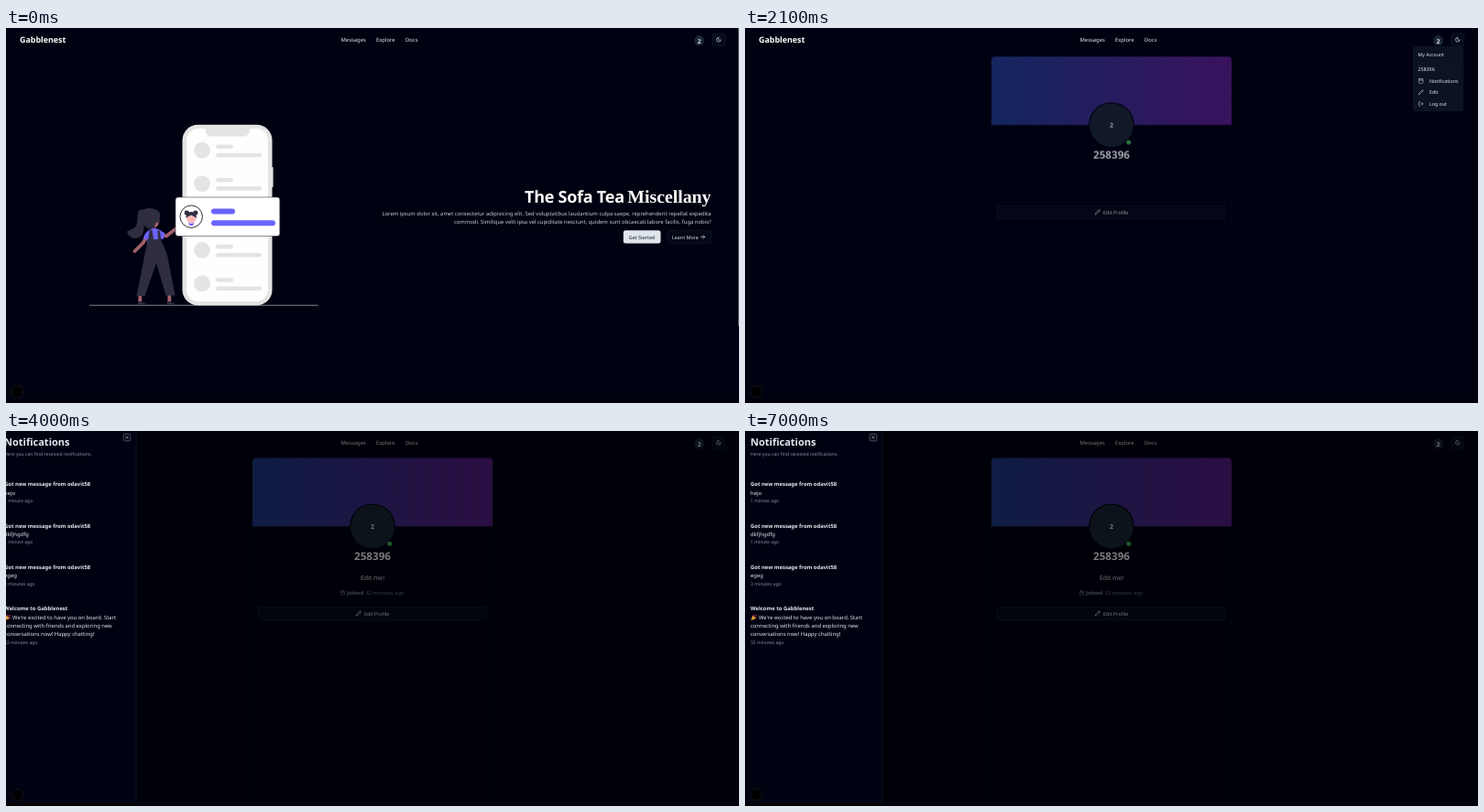
An HTML page that plays this animation: 800 px wide and 410 px high, repeating every 7.4 s.

```html
<!DOCTYPE html>
<html lang="en">
<head>
<meta charset="utf-8">
<title>Chat app tour</title>
<style>
html, body { margin: 0; width: 100%; height: 100%; overflow: hidden; background: #000211; }
svg { display: block; }
text { font-family: "Noto Sans", "Open Sans", sans-serif; fill: #e6e9ee; text-rendering: geometricPrecision; white-space: pre; }
.b6 { font-weight: 600; }
.b7 { font-weight: 700; }
.b8 { font-weight: 800; }
.mid { text-anchor: middle; }
.end { text-anchor: end; }
.t50 { font-size: 5px; }
.t53 { font-size: 5.3px; }
.t59 { font-size: 5.88px; }
.muted { fill: #8591a5; }
.soft { fill: #c9ced7; }
.icon { fill: none; stroke: #e3e7ed; stroke-width: 2.4; stroke-linecap: round; stroke-linejoin: round; }

/* One loop is 7400 ms; 100 ms is 1.3513 %. */
.anim { animation: 7400ms linear infinite paused; }
#scrollbar { animation-name: scrollbar; animation-timing-function: step-end; }
#landing { animation-name: landing; animation-timing-function: step-end; }
#status { animation-name: status; animation-timing-function: step-end; }
#profile { animation-name: profile; }
#details { animation-name: details; }
#menu { animation-name: menu; transform-origin: 784px 20px; }
#hover { animation-name: hover; animation-timing-function: step-end; }
#dim { animation-name: dim; }
#sheet { animation-name: sheet; }
#unread { animation-name: unread; }
#close { animation-name: close; }

@keyframes scrollbar {
  0% { opacity: 1 } 1.351% { opacity: .75 } 2.702% { opacity: .6 } 13.513%, 100% { opacity: 0 }
}
@keyframes landing { 0% { opacity: 1 } 27.027%, 100% { opacity: 0 } }
@keyframes status { 0% { opacity: 0 } 24.324% { opacity: 1 } 27.027%, 100% { opacity: 0 } }
@keyframes profile {
  0%, 27.02% { opacity: 0; transform: translateY(4px) }
  27.027% { opacity: .3; transform: translateY(4px) }
  28.378% { opacity: .66; transform: translateY(1.7px) }
  29.729% { opacity: .85; transform: translateY(.8px) }
  31.081% { opacity: .95; transform: translateY(.3px) }
  33.783%, 100% { opacity: 1; transform: none }
}
@keyframes details {
  0%, 28.4% { opacity: 0; animation-timing-function: ease-out }
  33.783% { opacity: .96 }
  36.486%, 100% { opacity: 1 }
}
@keyframes menu {
  0%, 13.1% { opacity: 0; transform: translateY(-2px) scale(.95); animation-timing-function: ease }
  15.4%, 48.65% { opacity: 1; transform: none }
  50.2%, 100% { opacity: 0; transform: scale(.95) }
}
@keyframes hover {
  0% { opacity: 0; transform: none }
  20.27% { opacity: .25; transform: none }
  40.54% { opacity: 1; transform: translateY(37.5px) }
  43.243%, 100% { opacity: 1; transform: translateY(12.5px) }
}
@keyframes dim {
  0%, 49.189% { opacity: 0; animation-timing-function: ease }
  51.216%, 100% { opacity: .5 }
}
@keyframes sheet {
  0%, 49.189% { transform: translateX(-151px); animation-timing-function: cubic-bezier(.4, 0, .2, 1) }
  55.945%, 100% { transform: none }
}
@keyframes unread {
  0%, 58.918% { opacity: 0 }
  61.62%, 65.6% { opacity: 1 }
  68.918%, 100% { opacity: 0 }
}
@keyframes close {
  0%, 77.5% { opacity: .8 }
  79.729%, 92.5% { opacity: 1 }
  94.594%, 100% { opacity: .8 }
}
</style>
</head>
<body>
<svg width="800" height="410" viewBox="0 0 800 410">
  <defs>
    <linearGradient id="bannerFill">
      <stop offset="0" stop-color="#1e3a8a"/><stop offset="1" stop-color="#581c87"/>
    </linearGradient>
    <g id="row" fill="#e4e4e3">
      <circle cx="214" cy="133.7" r="8.9"/>
      <rect x="229" y="127.5" width="19" height="4.6" rx="2.3"/>
      <rect x="229" y="136.7" width="50" height="4.6" rx="2.3"/>
    </g>
    <g id="pencil"><path d="M17 3a2.8 2.8 0 1 1 4 4L7.500 20.500 2 22l1.500-5.500ZM15 5l4 4"/></g>
    <g id="calendar"><path d="M8 2v4M16 2v4M3 10h18"/><rect x="3" y="4" width="18" height="18" rx="2"/></g>
  </defs>

  <rect width="800" height="410" fill="#000211"/>

  <g id="landing" class="anim">
    <path d="M91 303.200H340.500" stroke="#85868c"/>
    <!-- phone -->
    <rect x="289" y="152" width="2.600" height="22" rx="1" fill="#e4e4e3"/>
    <rect x="192.500" y="105.700" width="98" height="197.500" rx="17" fill="#e4e4e3"/>
    <rect x="197" y="110" width="89" height="189" rx="13" fill="#fefefc"/>
    <path d="M217.500 109.500H266V112a6.500 6.500 0 0 1-6.500 6.500H224a6.500 6.500 0 0 1-6.500-6.500Z" fill="#e4e4e3"/>
    <use href="#row"/><use href="#row" y="36.400"/><use href="#row" y="109.300"/><use href="#row" y="145.700"/>

    <!-- woman -->
    <g fill="#2f2e41">
      <path d="M152 199C142 195 144 206 143 213C141.500 221 137 219 132 222.500C134 231 146 233 149.500 224C152 217 149 211 154 207Z"/>
      <path d="M144 301.500C143 299 146 299 148 299.500L154.500 302.500H143.500ZM175.500 301.500C175 299 178 299 180 299.500L186 302.500H175.500Z"/>
    </g>
    <g fill="none" stroke="#a0616a" stroke-linecap="round" stroke-width="3.800">
      <path d="M155 226L149.500 235L140.500 244M168 226L175 227.500L186 219"/>
      <path d="M146.300 290V299M178.300 290V299M161 214V222" stroke-linecap="butt"/>
    </g>
    <ellipse cx="162" cy="210" rx="5.500" ry="8" fill="#a0616a"/>
    <path d="M146.500 206C146 196 160 194.500 167 201C169.500 205 168 210 166.500 214C164 210 163 214 162 219C155 222 147 215 146.500 206Z" fill="#2f2e41"/>
    <path d="M157 220.500C161 218.500 165 219 168 221L173.500 224.500L171.500 231L166 230L165 238H154L154.500 231L149.500 230.500C151 226 153 222.500 157 220.500Z" fill="#6c63ff"/>
    <path d="M156.500 221.500L159.500 220.500L161 231H166L165.500 221L168 222L169.500 233C172 239 175 243 176.500 251L184.500 292.500H174.500L164 257L151.500 293H142.500L149.500 258C151 249 152 243 154.500 235Z" fill="#2f2e41"/>

    <!-- highlighted message -->
    <rect x="185" y="185" width="113.800" height="42.500" rx="3" fill="#fff" stroke="#3f3d56" stroke-width=".6"/>
    <circle cx="202.200" cy="206.200" r="12.200" fill="#fff" stroke="#2f2e41"/>
    <circle cx="202.200" cy="208" r="5.200" fill="#ffb8b8"/>
    <g fill="#2f2e41">
      <circle cx="197.300" cy="202" r="2.600"/><circle cx="206.800" cy="202" r="2.600"/>
      <path d="M196.500 208C196 202 200 201 202 201C206 201 208.500 204 207.800 208C206 206 204 205.500 202 204.500C200 205.500 198 206 196.500 208Z"/>
    </g>
    <path d="M199 212.500Q202 215 205.500 212.500L204 216H200.500Z" fill="#6c63ff"/>
    <g fill="#6c63ff">
      <rect x="224" y="197.500" width="26" height="6" rx="3"/>
      <rect x="224" y="210.300" width="70" height="6" rx="3"/>
    </g>

    <text class="b8 end" x="674.800" y="190.800" font-size="18" letter-spacing="-.25" style="fill:#fff">The Sofa Tea</text>
    <text class="b7 end" x="769.500" y="190.800" font-size="19.800" style="fill:#fff;font-family:'Liberation Serif',serif">Miscellany</text>
    <text class="t59 end soft" x="769.500" y="205">Lorem ipsum dolor sit, amet consectetur adipisicing elit. Sed voluptatibus laudantium culpa saepe, reprehenderit repellat expedita</text>
    <text class="t59 end soft" x="769.500" y="214.300">commodi. Similique velit ipsa vel cupiditate nesciunt, quidem sunt obcaecati labore facilis, fuga nobis?</text>
    <rect x="673.800" y="221.200" width="40.700" height="14.300" rx="2.500" fill="#dfe5ea"/>
    <text class="t53 mid" x="694" y="230.500" style="fill:#0f172a">Get Started</text>
    <rect x="722.300" y="221.500" width="47" height="13.800" rx="2.500" fill="#030817" stroke="#151d2d" stroke-width=".6"/>
    <text class="t53" x="727" y="230.500">Learn More</text>
    <path class="icon" transform="translate(757.300 225.200) scale(.27)" d="M4 12h16M13 5l7 7-7 7"/>
  </g>

  <g id="profile" class="anim">
    <path d="M268.500 407V33.500a4 4 0 0 1 4-4H527.500a4 4 0 0 1 4 4V407" fill="none" stroke="#060b1a" stroke-width=".8"/>
    <path d="M269 104.300V33.500a4 4 0 0 1 4-4H527a4 4 0 0 1 4 4V104.300Z" fill="url(#bannerFill)"/>
    <circle cx="400" cy="104.400" r="25" fill="#000211"/>
    <circle cx="400" cy="104.400" r="23.800" fill="#1a2736"/>
    <text class="b6 mid" x="400" y="107" font-size="7">2</text>
    <circle cx="418.700" cy="123.300" r="2.500" fill="#3fae55"/>
    <text class="b6 mid" x="400" y="141" font-size="11.650" style="fill:#f4f6f9">258396</text>
    <g id="details" class="anim">
      <text class="mid" x="400" y="162.600" font-size="6.800">Edit me!</text>
      <use class="icon" href="#calendar" transform="translate(364.900 174.200) scale(.225)" style="stroke:#7b8595"/>
      <text class="b6" x="372" y="179.200" font-size="5.800" style="fill:#828c9c">Joined</text>
      <text x="392.500" y="179.200" font-size="5.770" style="fill:#6a7485">32 minutes ago</text>
    </g>
    <rect x="275.300" y="192.500" width="249.400" height="14" rx="2.500" fill="#050b1b" stroke="#151e30" stroke-width=".7"/>
    <use class="icon" href="#pencil" transform="translate(381.700 196.300) scale(.265)"/>
    <text x="391" y="201.500" font-size="5.400">Edit Profile</text>
  </g>

  <g id="header">
    <text class="b8" x="15" y="16.200" font-size="8.900" style="fill:#fff">Gabblenest</text>
    <text class="t59" x="365.500" y="15">Messages</text>
    <text class="t59" x="404" y="15">Explore</text>
    <text class="t59" x="436" y="15">Docs</text>
    <rect x="751.500" y="8.300" width="10.200" height="11" rx="4.600" fill="#1a2736"/>
    <text class="b6 mid" x="756.600" y="16.500" font-size="6.600">2</text>
    <rect x="770.800" y="6" width="14" height="14" rx="2.500" fill="#060c1c" stroke="#131b2b" stroke-width=".7"/>
    <path class="icon" transform="translate(774.700 9.700) scale(.255)" d="M12 3a6 6 0 0 0 9 9 9 9 0 1 1-9-9Z"/>
  </g>

  <g id="menu" class="anim">
    <rect x="729.500" y="20.600" width="54.300" height="70" rx="2.500" fill="#0a1223" stroke="#111a2b" stroke-width=".7"/>
    <path d="M730 37.300H783.500" stroke="#131c2e" stroke-width=".5"/>
    <rect id="hover" class="anim" x="731.500" y="39.300" width="50.300" height="12.300" rx="1.500" fill="#0f182a"/>
    <text x="734.500" y="31.300" font-size="5.200">My Account</text>
    <text class="t53" x="734.500" y="47.400">258396</text>
    <text class="t53" x="747" y="59.800">Notifications</text>
    <text class="t53" x="747" y="72.300">Edit</text>
    <text class="t53" x="747" y="84.900">Log out</text>
    <g class="icon" style="stroke:#a7afbc">
      <use href="#calendar" transform="translate(734.600 54.600) scale(.26)"/>
      <use href="#pencil" transform="translate(734.600 67.200) scale(.26)"/>
      <path transform="translate(734.600 79.800) scale(.26)" d="M9 21H5a2 2 0 0 1-2-2V5a2 2 0 0 1 2-2h4M16 17l5-5-5-5M21 12H9"/>
    </g>
  </g>

  <rect y="406.500" width="800" height="3.500" fill="#050008"/>
  <rect id="scrollbar" class="anim" x="799" width="1" height="326" fill="#5a5f68"/>
  <rect id="dim" class="anim" width="800" height="410"/>

  <g id="sheet" class="anim">
    <rect x="-1" width="151" height="406.500" fill="#000212"/>
    <path d="M150 0V406.500" stroke="#10182a" stroke-width=".8"/>
    <text class="b6" x="6" y="16" font-size="11">Notifications</text>
    <text class="muted" x="6" y="26.600" font-size="5.100">Here you can find received notifications.</text>
    <g id="close" class="anim">
      <rect x="136.200" y="3.200" width="7.600" height="7.600" rx="1.600" fill="none" stroke="#7d8694" stroke-width=".8"/>
      <path d="M138.300 5.300L141.700 8.700M141.700 5.300L138.300 8.700" stroke="#c3c9d2" stroke-width=".7"/>
    </g>
    <rect id="unread" class="anim" y="183.200" width="146.300" height="57.600" fill="#1a2735"/>
    <g id="notes"></g>
    <path d="M6.500 207L8.500 201.500L12 205Z" fill="#e8a33a"/>
    <path d="M9.500 200.500L10.500 202.500M12.500 201L11 203.500M13 204.500L11.500 204" stroke="#d9485f" stroke-width=".8"/>
  </g>

  <circle cx="12.500" cy="397.700" r="6.400" fill="#000" stroke="#1b1c20" stroke-width=".7"/>

  <g id="status" class="anim">
    <path d="M0 403.800H133.500a2 2 0 0 1 2 2V410H0Z" fill="#25272b"/>
    <text x="1" y="408.800" font-size="4.360" style="fill:#c2c5ca">localhost:3000/profile/5c167a47-29fe-4b46-89eb-12b6345f10a9</text>
  </g>
</svg>
<script>
const sender = "Got new message from odavit58";
const notes = [
  [sender, ["hejo"], "1 minute ago"],
  [sender, ["dkfjhgdfg"], "1 minute ago"],
  [sender, ["egeg"], "3 minutes ago"],
  ["Welcome to Gabblenest", [
    "We're excited to have you on board. Start",
    "connecting with friends and exploring new",
    "conversations now! Happy chatting!"], "32 minutes ago"]
];
const line = (cls, x, y, s) => `<text class="${cls}" x="${x}" y="${y}">${s}</text>`;
document.getElementById("notes").innerHTML = notes.map(([title, body, age], i) => {
  const y = 60.3 + i * 45.3;
  // The welcome note leaves room for its party popper.
  const rows = body.map((s, k) => line("t59", i === 3 && k === 0 ? 15 : 6, y + 9.4 * (k + 1), s));
  return line("t59 b6", 6, y, title) + rows.join("") +
    line("t50 muted", 6, y + 9.4 * body.length + 8.3, age);
}).join("");

// The screen refreshes ten times a second.
const LOOP = 7400, STEP = 100;
const tracks = document.getAnimations();
const start = performance.now();
function draw() {
  const t = Math.floor((performance.now() - start) / STEP) * STEP % LOOP;
  for (const a of tracks) a.currentTime = t;
  requestAnimationFrame(draw);
}
draw();
</script>
</body>
</html>
```
